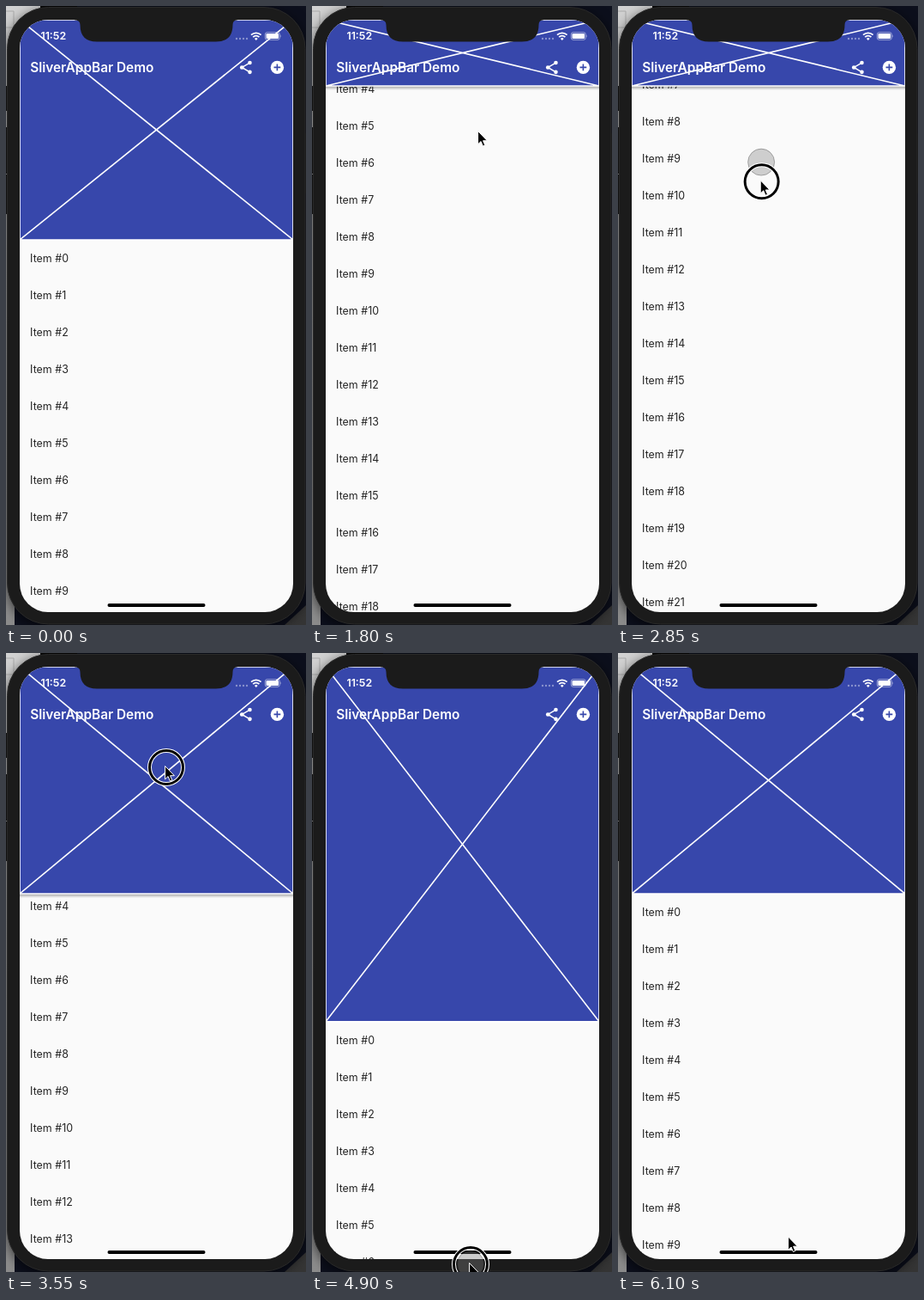
Animation, 350 px wide and 720 px high, one loop 6150 ms. Source, as an HTML page:

```html
<!DOCTYPE html>
<html lang="en">
<head>
<meta charset="utf-8">
<title>SliverAppBar Demo</title>
<style>
  html, body { margin: 0; width: 100%; height: 100%; overflow: hidden; background: #0c0f1c; }
  svg { display: block; width: 350px; height: 720px; font-family: Inter, Roboto, sans-serif; }
  #list { font-size: 12.4px; letter-spacing: .03px; fill: #242424; }
  .title { font-size: 15.4px; font-weight: 600; }
  .clock { font-size: 12.4px; font-weight: 600; }
  .white { fill: #fff; }
  .phone { filter: drop-shadow(0 3px 7px rgba(0, 0, 0, .6)); }
</style>
</head>
<body>
<svg viewBox="0 0 350 720">
  <defs>
    <clipPath id="screen"><rect x="16" y="16" width="319" height="689" rx="33"/></clipPath>
    <linearGradient id="fade" x2="0" y2="1">
      <stop stop-color="#000" stop-opacity=".36"/>
      <stop offset="1" stop-color="#000" stop-opacity="0"/>
    </linearGradient>
    <linearGradient id="desk" x2="0" y2="1">
      <stop stop-color="#d2d2d2"/>
      <stop offset=".4" stop-color="#a4a4a4"/>
      <stop offset="1" stop-color="#8c8c8c"/>
    </linearGradient>
  </defs>

  <!-- desktop and phone body -->
  <path d="M0 0H40V60H10V720H0z" fill="url(#desk)"/>
  <path d="M0 6H9V25H0" fill="none" stroke="#aaa"/>
  <path d="M40 0H83V10H40z" fill="#050505"/>
  <path d="M325 720L350 697V720z" fill="#353535"/>
  <g class="phone">
    <path d="M0 93H4V122H0zM0 141H4V195H0zM0 196H4V242H0zM346 148H350V218H346z" fill="#111"/>
    <rect x="1.5" y="1.5" width="347.5" height="717.5" rx="48" fill="#1b1b1b" stroke="#292929"/>
  </g>

  <g clip-path="url(#screen)">
    <path d="M16 16H335V705H16z" fill="#fafafa"/>
    <g id="list"></g>
    <rect id="shadow" x="16" width="319" height="5" fill="url(#fade)"/>
    <path id="bar" fill="#3747ab"/>
    <path id="cross" fill="none" stroke="#fff" stroke-width="1.6"/>

    <!-- status bar -->
    <text class="clock white" x="40.4" y="39.4">11:52</text>
    <g class="white" opacity=".4">
      <circle cx="269" cy="38" r="1.2"/><circle cx="273" cy="38" r="1.2"/>
      <circle cx="277" cy="38" r="1.2"/><circle cx="281" cy="38" r="1.2"/>
    </g>
    <path d="M286 33.6a8.4 8.4 0 0 1 11.6 0M288.2 36.2a5.2 5.2 0 0 1 7.2 0" fill="none" stroke="#fff" stroke-width="1.8"/>
    <path class="white" d="M289.9 37.9a2.8 2.8 0 0 1 3.8 0L291.8 39.9z"/>
    <rect x="302.3" y="30.7" width="17" height="8.6" rx="2.4" fill="none" stroke="#fff" stroke-opacity=".5"/>
    <rect class="white" x="303.5" y="31.9" width="14.6" height="6.2" rx="1.3"/>
    <path d="M320.4 33.4q1.6 1.6 0 3.2z" fill="#fff" opacity=".5"/>

    <!-- toolbar -->
    <text class="title white" x="28.2" y="77">SliverAppBar Demo</text>
    <g transform="translate(270.6 62.2) scale(.77)" class="white">
      <path d="M18 5L6 12L18 19" fill="none" stroke="#fff" stroke-width="2"/>
      <circle cx="18" cy="5" r="3"/><circle cx="6" cy="12" r="3"/><circle cx="18" cy="19" r="3"/>
    </g>
    <circle class="white" cx="316.4" cy="71.4" r="7.7"/>
    <path d="M316.4 67.5V75.3M312.5 71.4H320.3" stroke="#3747ab" stroke-width="1.6"/>

    <rect x="118.5" y="695" width="114" height="4" rx="2"/>
  </g>

  <!-- notch -->
  <path d="M80 15H270V16.3Q264.5 16.5 264.5 22Q264.5 41.5 245 41.5H106Q86.5 41.5 86.5 22Q86.5 16.5 80 16.3z" fill="#1b1b1b"/>

  <circle id="touch" r="15.5" fill="#808080" fill-opacity=".36" stroke="#000" stroke-opacity=".35" stroke-width=".8"/>
  <g id="pointer">
    <g id="ring" fill="none">
      <circle r="19.5" stroke="#fff" stroke-width="5"/>
      <circle r="19.5" stroke="#000" stroke-width="3"/>
    </g>
    <path d="M-1.4 -1.5V13.8L2.1 10.5L4.4 16L6.9 15L4.6 9.7H9.4z" stroke="#fff"/>
  </g>
</svg>

<script>
  const LOOP = 6150, STEP = 50;
  const TOP = 16, OPEN = 280, CLOSED = 93, ROW = 43;
  const FAR = 511, PULL = -149;
  const $ = id => document.getElementById(id);

  // places where the pointer rests or turns: time, x, y
  const path = [
    [100, 190, 505], [400, 188, 528], [740, 188, 528], [1800, 195, 147],
    [2300, 195, 147], [2700, 167, 177], [2765, 167, 177], [3190, 172, 395],
    [3500, 187, 133], [3555, 187, 133], [4160, 180, 400], [4210, 180, 400],
    [4860, 185, 711], [5350, 185, 711], [5800, 200, 680.5], [LOOP, 200, 680.5]
  ];
  const presses = [[640, 1610], [2735, 3050], [3530, 5100]];

  // speed up, run evenly, slow down
  function ease(u, ramp = .2) {
    if (u > .5) return 1 - ease(1 - u, ramp);
    return (u < ramp ? u * u / (2 * ramp) : u - ramp / 2) / (1 - ramp);
  }

  function pointer(t) {
    const i = Math.max(1, path.findIndex(p => p[0] > t));
    const [t0, x0, y0] = path[i - 1], [t1, x1, y1] = path[i];
    const k = ease(Math.max(0, (t - t0) / (t1 - t0)));
    return [x0 + (x1 - x0) * k, y0 + (y1 - y0) * k];
  }

  const pressed = t => presses.some(([a, b]) => t >= a && t < b);

  // the finger and the list trail the pointer by one step
  const finger = t => pointer(t - STEP);

  // distance coasted after a release
  const coast = (reach, ms) => reach * (1 - Math.exp(-ms / 500));

  // overdamped spring back to the top, from 1 to 0
  const spring = s => (22 * Math.exp(-9.1 * s) - 9.1 * Math.exp(-22 * s)) / 12.9;

  function scroll(t) {
    const y = finger(t)[1];
    if (t < 1660) return Math.max(0, 513 - y);
    if (t < 2800) return Math.min(FAR, 328 + coast(202, t - 1660));
    if (t < 3100) return FAR - Math.max(0, y - 191);
    if (t < 3600) return 369 - coast(320, t - 3100);
    if (t < 5150) {
      const left = 167 - Math.max(0, y - 147);
      return left > 0 ? left : 329 * left / (480 - left);
    }
    return PULL * spring((t - 5150) / 1000);
  }

  // the bar floats: it reopens as soon as the list is pulled down
  function barBottom(t, s) {
    if (s < 0) return OPEN - s;
    return t < 2800 ? Math.max(CLOSED, OPEN - s) : Math.min(OPEN, CLOSED + FAR - s);
  }

  const show = (el, on) => el.setAttribute("visibility", on ? "visible" : "hidden");
  const move = (el, x, y) => el.setAttribute("transform", `translate(${x} ${y})`);

  function draw(t) {
    const s = scroll(t), b = barBottom(t, s);
    move($("list"), 0, -s);
    $("bar").setAttribute("d", `M16 ${TOP}H335V${b}H16z`);
    $("cross").setAttribute("d", `M16 ${TOP}H335V${b}H16zL335 ${b}M335 ${TOP}L16 ${b}`);
    $("shadow").setAttribute("y", b);
    show($("shadow"), s > OPEN - b + 1);

    move($("pointer"), ...pointer(t));
    show($("pointer"), t >= 100);
    show($("ring"), pressed(t));
    move($("touch"), ...finger(t));
    show($("touch"), pressed(t - STEP));
  }

  for (let i = 0; i < 25; i++) {
    const item = document.createElementNS("http://www.w3.org/2000/svg", "text");
    item.setAttribute("x", 28.1);
    item.setAttribute("y", 306.4 + ROW * i);
    item.textContent = "Item #" + i;
    $("list").append(item);
  }

  const start = performance.now();
  function tick() {
    const t = Math.max(0, performance.now() - start) % LOOP;
    draw(Math.floor((t + 5) / STEP) * STEP % LOOP);
    requestAnimationFrame(tick);
  }
  tick();
</script>
</body>
</html>
```
